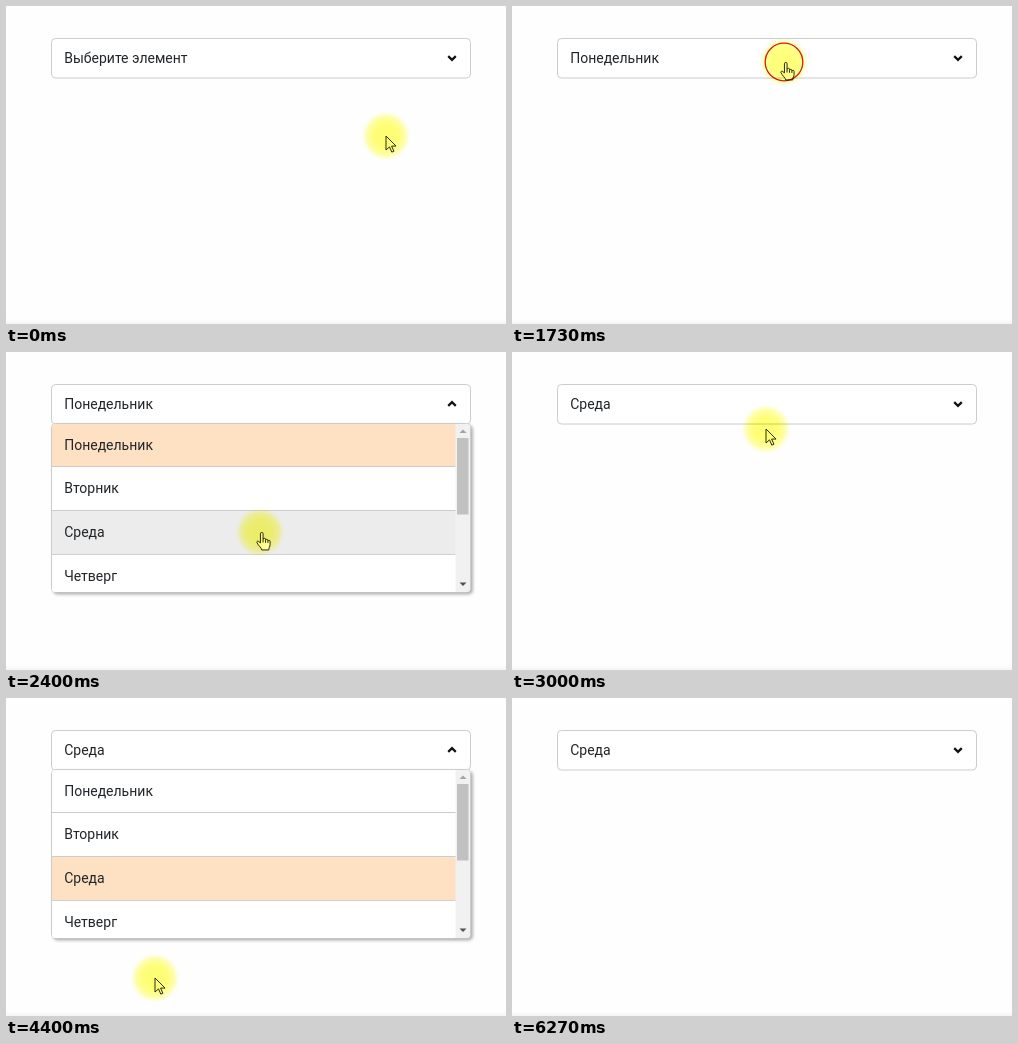
Animation of 500x318 px, one loop 6740 ms. Source, as an HTML page:

```html
<!DOCTYPE html>
<html lang="ru">
<head>
<meta charset="utf-8">
<title>Выпадающий список</title>
<style>
  html, body { margin: 0; width: 100%; height: 100%; overflow: hidden; background: #fefefe; }
  svg { display: block; width: 500px; height: 318px; }
  text { font: 14px Roboto, Arial, sans-serif; fill: #212529; }
  .frame { fill: #fff; stroke: #ccc; }
  .line { stroke: #ccc; }
  #menu .frame { filter: drop-shadow(2px 2px 1.5px rgba(0, 0, 0, .3)); }
  #halo { mix-blend-mode: multiply; }
  .cursor { fill: #fff; stroke: #222; stroke-width: 1.1; stroke-linejoin: round; }
</style>
</head>
<body>
<svg viewBox="0 0 500 318">
  <defs>
    <radialGradient id="glow">
      <stop offset="0" stop-color="#ffff70"/>
      <stop offset=".5" stop-color="#ffff78"/>
      <stop offset=".78" stop-color="#ffff88" stop-opacity=".72"/>
      <stop offset="1" stop-color="#ffffa0" stop-opacity="0"/>
    </radialGradient>
    <linearGradient id="foot" x1="0" y1="0" x2="0" y2="1">
      <stop offset="0" stop-color="#fefefe"/>
      <stop offset="1" stop-color="#f4f4f4"/>
    </linearGradient>
    <clipPath id="inside"><rect x="46" y="72" width="418" height="168" rx="3"/></clipPath>
  </defs>
  <rect width="500" height="318" fill="#fefefe"/>
  <rect y="313" width="500" height="5" fill="url(#foot)"/>

  <rect class="frame" x="45.5" y="32.5" width="419" height="39.5" rx="4"/>
  <text id="title" x="58.2" y="57"></text>
  <path id="chevron" d="M-3.8-1.9L0 1.9L3.8-1.9" fill="none" stroke="#111" stroke-width="2.2"/>

  <g id="menu">
    <rect class="frame" x="45.5" y="71.5" width="419" height="168.5" rx="4"/>
    <g clip-path="url(#inside)">
      <g id="rows"></g>
      <rect x="449.5" y="72" width="15" height="168" fill="#f1f1f1"/>
      <rect x="451" y="86" width="11.5" height="76.5" fill="#c1c1c1"/>
      <path d="M453.5 81l3.5-3.5 3.5 3.5z" fill="#a3a3a3"/>
      <path d="M453.5 230.5l3.5 3.5 3.5-3.5z" fill="#505050"/>
    </g>
  </g>

  <g id="pointer">
    <path id="arrow" class="cursor" transform="scale(.876)" d="M0 0V16l4-3.6 2.6 6 2.4-1-2.6-5.9H11.5z"/>
    <path id="hand" class="cursor" transform="scale(.876) translate(-5 -.5)"
      d="M5.5 13V2.5a1.5 1.5 0 0 1 3 0V9a1.4 1.4 0 0 1 2.8 0v.8a1.4 1.4 0 0 1 2.7.3v.7a1.3 1.3 0 0 1 2.5.3V15c0 2.5-1.5 3-1.5 6H7c0-2-4-5-5.5-8.5c-.5-1.5 1.2-2 2.2-1zM8.5 9v3.5M11.3 9.8v3M14 10.5v2.5"/>
  </g>
  <g id="halo">
    <circle r="24.5" fill="url(#glow)"/>
    <circle id="ring" r="18.8" fill="#ffff80" fill-opacity=".6" stroke="#d61a1a" stroke-width="1.3"/>
  </g>
</svg>
<script>
const LOOP = 6740, STEP = 1000 / 15, ROW = 43.8, TOP = 71.5, FADE = 130;
const $ = id => document.getElementById(id);
const days = ['Понедельник', 'Вторник', 'Среда', 'Четверг'];

const smooth = p => p * p * (3 - 2 * p);
const easeIn = p => p * p;
const easeOut = p => 1 - (1 - p) ** 2;

// time, x, y, easing towards this point
const path = [
  [0, 380, 130], [60, 380, 130], [470, 273, 50], [600, 273, 50], [930, 272, 101],
  [1270, 272, 98], [1650, 272, 56], [1990, 272, 56], [2400, 254, 180], [2600, 254, 180],
  [3000, 254, 77], [3200, 254, 64], [3330, 254, 56], [3500, 254, 56],
  [4400, 149, 280, easeOut], [5600, 149, 280], [6260, 333, 350, easeIn]
];
const presses = [[465, 600], [1060, 1200], [1727, 1865], [2460, 2530], [3325, 3400], [4795, 4930]];
const openings = [[600, 1200], [1865, 2530], [3400, 4930]];

const clamp = v => Math.max(0, Math.min(1, v));
const within = (spans, t) => spans.some(([a, b]) => t >= a && t < b);

function pointerAt(t) {
  const i = path.findIndex(k => k[0] > t);
  if (i < 0) return path[path.length - 1].slice(1, 3);
  if (i === 0) return path[0].slice(1, 3);
  const [t0, x0, y0] = path[i - 1];
  const [t1, x1, y1, ease = smooth] = path[i];
  const p = ease((t - t0) / (t1 - t0));
  return [x0 + (x1 - x0) * p, y0 + (y1 - y0) * p];
}

const openness = t => Math.max(...openings.map(([a, b]) =>
  Math.min(clamp((t - a) / FADE), 1 - clamp((t - b) / FADE))));

$('rows').innerHTML = days.map((day, i) => {
  const y = TOP + i * ROW;
  return `<rect x="46" y="${y}" width="404" height="${ROW}"/>
    <path class="line" d="M46 ${Math.round(y + ROW) - .5}H450"/>
    <text x="58.2" y="${y + 26}">${day}</text>`;
}).join('');
const fills = $('rows').querySelectorAll('rect');

function draw(t) {
  const [x, y] = pointerAt(t);
  const open = openness(t);
  const active = within(openings, t);
  const chosen = t < 1200 ? -1 : t < 2530 ? 0 : 2;
  // hover colour follows the pointer with a short lag
  const hoverY = pointerAt(t - 80)[1];
  const hover = active && hoverY < 240 ? Math.floor((hoverY - TOP) / ROW) : -1;

  $('title').textContent = chosen < 0 ? 'Выберите элемент' : days[chosen];
  $('chevron').setAttribute('transform', `translate(446 52) rotate(${180 * open})`);
  $('menu').setAttribute('opacity', open);
  fills.forEach((r, i) => r.setAttribute('fill',
    i === chosen ? '#fee0c2' : i === hover ? '#ececec' : '#fff'));

  const onControl = y > 32 && y < (active ? 240 : 72);
  $('hand').style.display = onControl ? '' : 'none';
  $('arrow').style.display = onControl ? 'none' : '';
  $('ring').style.display = within(presses, t) ? '' : 'none';
  for (const id of ['pointer', 'halo'])
    $(id).setAttribute('transform', `translate(${x} ${y})`);
}

const start = performance.now();
function tick() {
  const t = (performance.now() - start) % LOOP;
  draw(Math.floor((t + 5) / STEP) * STEP);
  requestAnimationFrame(tick);
}
tick();
</script>
</body>
</html>
```
